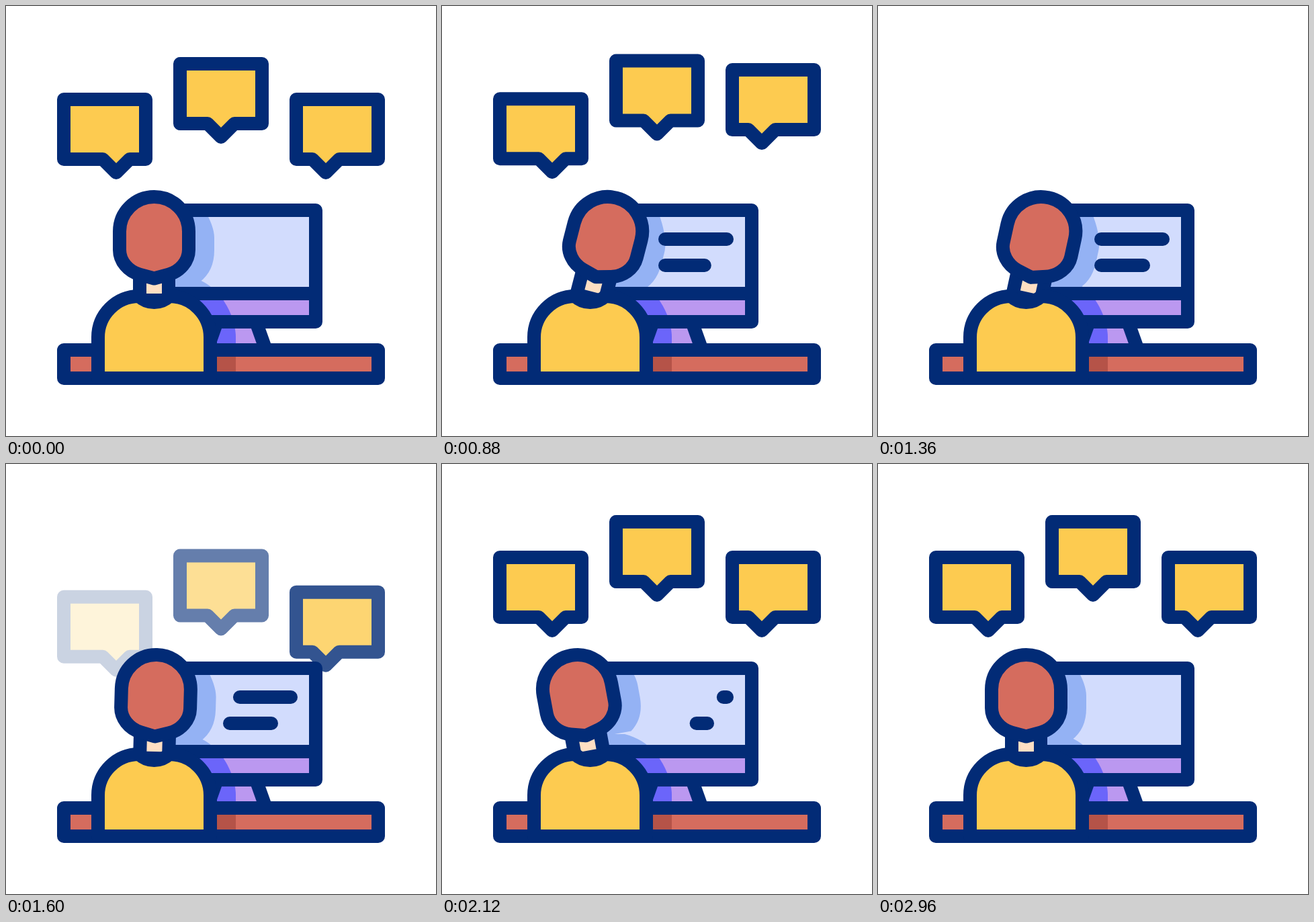
Animation of 640x640 px, one loop 3 s. Source, as an HTML page:

```html
<!DOCTYPE html>
<html lang="en">
<head>
<meta charset="utf-8">
<title>Online discussion</title>
<style>
  html, body { margin: 0; height: 100%; overflow: hidden; background: #fff; }
  svg { display: block; width: 100%; height: 100%; }
  .ink { stroke: #022b76; stroke-width: 20; stroke-linejoin: round; stroke-linecap: round; }
  .yellow { fill: #fdcb50; }
  .red { fill: #d56c5e; }
  .lilac { fill: #bb98f0; }
  .violet { fill: #6b65fa; }
  .none { fill: none; }
</style>
</head>
<body>
<svg viewBox="0 0 640 640">
  <defs>
    <path id="cast" d="M342 570V493C342 467 324 415 272 402H200V570Z"/>
    <path id="foot" d="M372 470L387 512H299L314 470Z"/>
    <clipPath id="castClip"><use href="#cast"/></clipPath>
    <clipPath id="screenClip"><rect x="225" y="304" width="236" height="124"/></clipPath>
  </defs>

  <g id="bubbles"></g>

  <!-- stand -->
  <use href="#foot" class="lilac"/>
  <g clip-path="url(#castClip)"><use href="#foot" class="violet"/></g>
  <use href="#foot" class="ink none"/>

  <!-- monitor -->
  <rect x="225" y="304" width="236" height="124" fill="#d2dcfd"/>
  <g clip-path="url(#screenClip)" fill="#94b2f4">
    <use href="#cast"/>
    <path class="lean" d="M270 270C288 288 310 322 310 345V363C310 384 303 400 288 411H220V270Z"/>
  </g>
  <rect x="225" y="428" width="236" height="42" class="lilac"/>
  <rect x="225" y="428" width="236" height="42" class="violet" clip-path="url(#castClip)"/>
  <path class="ink none" d="M225 304H461V470H225M225 428H461"/>
  <line class="ink text" y1="347" y2="347"/>
  <line class="ink text" y1="386" y2="386"/>

  <!-- desk -->
  <rect x="86" y="512" width="468" height="42" class="red"/>
  <rect x="300" y="512" width="42" height="42" fill="#b55348"/>
  <rect x="86" y="512" width="468" height="42" class="ink none"/>

  <!-- person -->
  <g class="lean">
    <path d="M199 395V438H242V395" class="ink" fill="#ffdfc3"/>
    <path class="ink red" d="M169 335.5A51.5 51.5 0 0 1 272 335.5V363C272 380 259 395 242 399.7L220.5 405.5L199 399.7C182 395 169 380 169 363Z"/>
  </g>
  <path class="ink yellow" d="M137 554V493A61 61 0 0 1 198 432A32.6 32.6 0 0 0 243 432A61 61 0 0 1 304 493V554Z"/>
</svg>
<script>
const LOOP = 3000;
const clamp = x => Math.min(1, Math.max(0, x));
// eased progress from 0 to 1 between two times
const ease = (t, from, to) => {
  const p = clamp((t - from) / (to - from));
  return p * p * (3 - 2 * p);
};

// left, top, tail position, travel, start of exit, start of entry
const bubbles = [
  [86, 139, 78, 60, 850, 1560],
  [259, 86, 61, 60, 800, 1480],
  [432, 139, 44, 70, 600, 1440]
].map(([x, y, tail, travel, exit, entry]) => {
  const el = document.createElementNS('http://www.w3.org/2000/svg', 'path');
  el.setAttribute('class', 'ink yellow');
  el.setAttribute('d', `M${x} ${y}h122v89H${x + tail + 20}l-20 20l-20 -20H${x}Z`);
  document.getElementById('bubbles').append(el);
  return { el, travel, exit, entry };
});

// line end, start of writing, start of erasing
const lines = [[424, 120, 1368], [395, 245, 1535]];
const lineEls = document.querySelectorAll('.text');
const leaning = document.querySelectorAll('.lean');

function drawBubble({ el, travel, exit, entry }, t) {
  const leaving = t < 1320;
  const dy = leaving ? -travel * ease(t, exit, exit + 480)
                     : travel * (1 - ease(t, entry, entry + 480));
  const alpha = leaving ? 1 - clamp((t - 1120) / 160) : clamp((t - entry) / 200);
  el.setAttribute('transform', `translate(0 ${dy})`);
  el.setAttribute('opacity', alpha);
}

function drawLine(el, [end, write, erase], t) {
  const head = ease(t, write, write + 755), tail = ease(t, erase, erase + 880);
  const at = p => 332 + (end - 332) * p;
  el.setAttribute('x1', at(tail));
  el.setAttribute('x2', at(head));
  el.setAttribute('visibility', head > 0 && tail < 1 ? 'visible' : 'hidden');
}

function draw(now) {
  const t = now % LOOP;
  bubbles.forEach(b => drawBubble(b, t));
  lines.forEach((line, i) => drawLine(lineEls[i], line, t));
  const angle = 14.5 * ease(t, 120, 872) - 25 * ease(t, 1229, 1956) + 10.5 * ease(t, 2240, 2720);
  const shift = 105 * Math.sin(angle * Math.PI / 180);
  leaning.forEach(el => el.setAttribute('transform', `translate(${shift} 0) rotate(${angle} 220.5 335)`));
  requestAnimationFrame(draw);
}
draw(performance.now());
</script>
</body>
</html>
```
